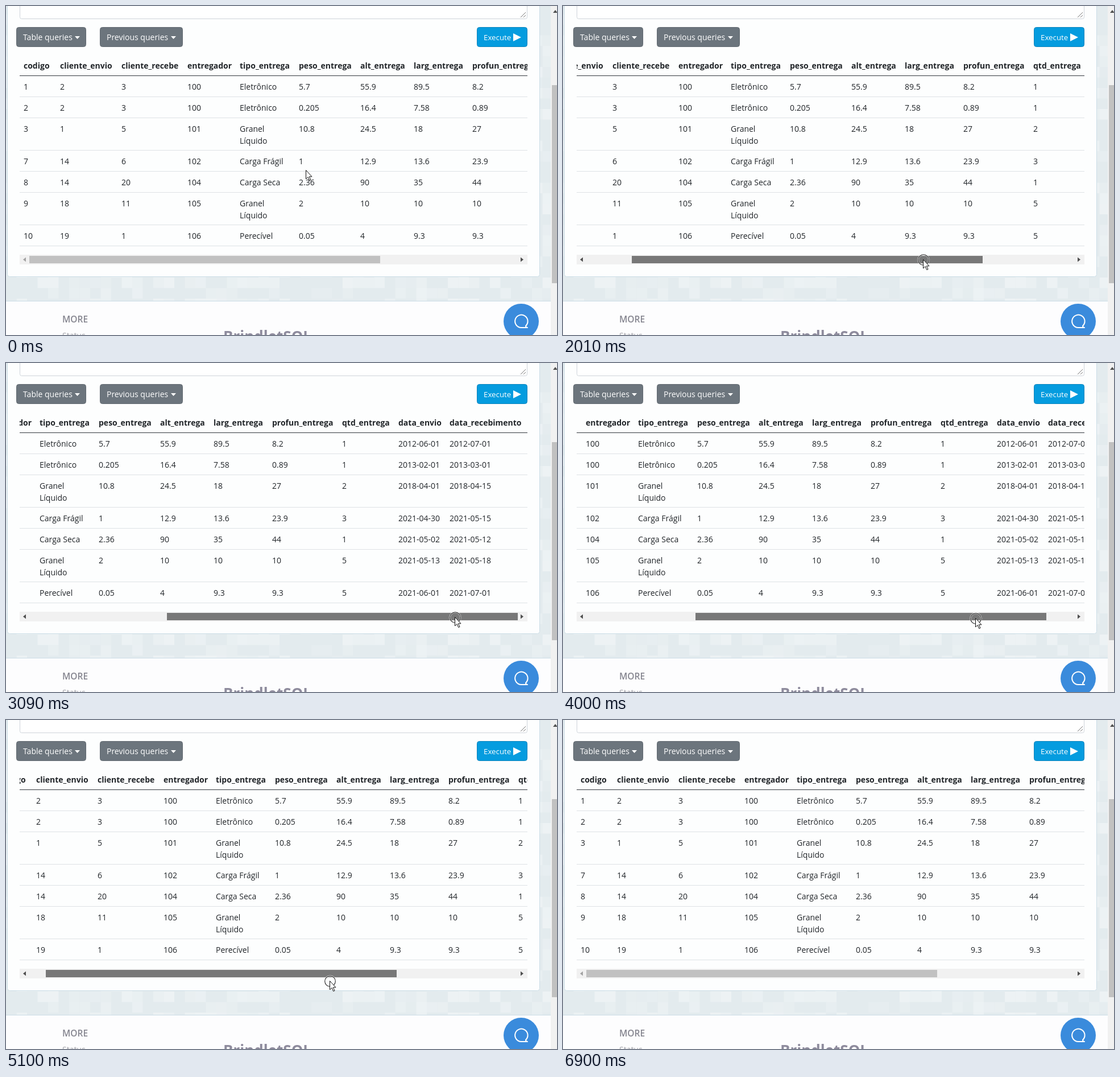
An HTML page for the animation above (7580 ms loop, 969x578 px).

```html
<!DOCTYPE html>
<html lang="en">
<head>
<meta charset="utf-8">
<title>Query results</title>
<style>
html, body { margin: 0; width: 100%; height: 100%; overflow: hidden; background: #e3ebee; }
svg { display: block; font: 14px "Open Sans", "Noto Sans", sans-serif; fill: #212529; }
.head { font-weight: 700; }
.white { fill: #fff; }
.grey { fill: #6c757d; stroke: #626a71; }
</style>
</head>
<body>
<svg width="969" height="578" viewBox="0 0 969 578">
  <defs><clipPath id="view"><rect x="24" y="90" width="893" height="340"/></clipPath></defs>
  <g id="tiles" fill="#fff"></g>
  <rect x="2.5" y="-9.5" width="936" height="485" rx="4" fill="#fdfefe" stroke="#cbdde6"/>
  <rect x="24.5" y="-9.5" width="892" height="32" rx="3" fill="#fff" stroke="#ced4da"/>
  <path d="M905 20l9-9M910 20l4-4" stroke="#777" fill="none"/>

  <g class="white">
    <rect class="grey" x="18.5" y="37.5" width="122" height="34" rx="4"/>
    <rect class="grey" x="165.5" y="37.5" width="145" height="34" rx="4"/>
    <rect x="828.5" y="37.5" width="88" height="34" rx="4" fill="#059cdf" stroke="#0b83bb"/>
    <text x="30" y="60">Table queries</text>
    <text x="177" y="60">Previous queries</text>
    <text x="840" y="60" font-size="13.3">Execute</text>
    <path d="M121 53h9l-4.5 5zM290 53h9l-4.5 5zM892 48l14 7-14 7z"/>
  </g>

  <g clip-path="url(#view)"><g id="table"></g></g>
  <g id="rules"></g>

  <rect x="24" y="437" width="893" height="17" fill="#f1f1f1"/>
  <path id="left" d="M35 441.5v8l-5-4z"/>
  <path d="M905 441.5v8l5-4z" fill="#505050"/>
  <rect id="thumb" y="439" width="617" height="13"/>

  <rect y="518" width="958" height="60" fill="#fdfdfe"/>
  <path d="M0 518.5h958" stroke="#cbdde6"/>
  <text x="99" y="556" font-size="15.5" font-weight="600" fill="#85858f">MORE</text>
  <text x="99" y="584" fill="#a3a3aa">Status</text>
  <text x="382" y="590" font-size="26" font-weight="700" fill="#8e8b9d">BrindletSQL</text>

  <rect x="958" width="11" height="578" fill="#f1f1f1"/>
  <rect x="960" y="139" width="9" height="348" fill="#c1c1c1"/>
  <path d="M962 12h8l-4-5z" fill="#505050"/>

  <circle cx="906" cy="554" r="31" fill="#3a8bdc"/>
  <path d="M914 562A11.2 11.2 0 1 0 906 565H917Q914 565 914 562z" fill="none" stroke="#fff" stroke-width="2" stroke-linejoin="round"/>

  <g id="pointer">
    <g id="ring" fill="none">
      <circle r="9.3" stroke="#fff" stroke-width="2.6" opacity=".75"/>
      <circle r="9.3" stroke="#222" stroke-width="1.1"/>
    </g>
    <path d="M-.5-.5V15l3.5-3.5 2.7 6 2.3-1-2.7-5.7H10z" fill="#fff" stroke="#111"/>
  </g>
</svg>
<script>
const $ = id => document.getElementById(id);
const set = (id, name, value) => $(id).setAttribute(name, value);

const columns = [31, 95, 203, 319, 411, 515, 623, 717, 820, 943, 1042, 1132];
const heads = "codigo,cliente_envio,cliente_recebe,entregador,tipo_entrega,peso_entrega,alt_entrega,larg_entrega,profun_entrega,qtd_entrega,data_envio,data_recebimento";
const rows = [
  "1,2,3,100,Eletrônico,5.7,55.9,89.5,8.2,1,2012-06-01,2012-07-01",
  "2,2,3,100,Eletrônico,0.205,16.4,7.58,0.89,1,2013-02-01,2013-03-01",
  "3,1,5,101,Granel|Líquido,10.8,24.5,18,27,2,2018-04-01,2018-04-15",
  "7,14,6,102,Carga Frágil,1,12.9,13.6,23.9,3,2021-04-30,2021-05-15",
  "8,14,20,104,Carga Seca,2.36,90,35,44,1,2021-05-02,2021-05-12",
  "9,18,11,105,Granel|Líquido,2,10,10,10,5,2021-05-13,2021-05-18",
  "10,19,1,106,Perecível,0.05,4,9.3,9.3,5,2021-06-01,2021-07-01"
];

function buildTable() {
  const line = (cells, y, cls = "") => cells.split(",").map((cell, i) =>
    cell.split("|").map((s, n) =>
      `<text class="${cls}" x="${columns[i]}" y="${y + 21 * n}">${s}</text>`).join("")).join("");
  const rule = (y, color) => `<path d="M24 ${Math.floor(y) + .5}h893" stroke="${color}"/>`;
  let y = 122.5;
  let text = line(heads, 110, "head");
  let rules = rule(y, "#32383e");
  for (const row of rows) {
    text += line(row, Math.round(y + 24.5));
    y += row.includes("|") ? 57.65 : 36.75;
    rules += rule(y, "#dee2e6");
  }
  $("table").innerHTML = text;
  $("rules").innerHTML = rules;
}

function buildTiles() {
  const size = 18.5;
  let seed = 7, out = "";
  for (let y = -4; y < 520; y += size)
    for (let x = 0; x < 958; x += size) {
      seed = seed * 16807 % 2147483647;
      const light = seed / 2147483647;
      if (light > .5)
        out += `<rect x="${x}" y="${y}" width="${size}" height="${size}" opacity="${(light - .4) * .6}"/>`;
    }
  $("tiles").innerHTML = out;
}

// Pointer moves: first step at `start`, `steps` equal jumps 120 ms apart, ending at x, y;
// `scroll` is the thumb offset reached by dragging.
const home = { x: 528, y: 289, scroll: 0 };
const moves = [
  { start: 310, steps: 3, x: 542, y: 409 },
  { start: 700, steps: 3, gap: 150, x: 544, y: 445 },
  { start: 1530, steps: 1, x: 553, y: 444, scroll: 6 },
  { start: 1650, steps: 8, x: 714, y: 447, scroll: 153 },
  { start: 2610, steps: 5, x: 790, y: 447, scroll: 242 },
  { start: 3640, steps: 4, x: 726, y: 449, scroll: 192 },
  { start: 4120, steps: 6, x: 651, y: 456, scroll: 110 },
  { start: 4860, steps: 7, x: 461, y: 462, scroll: -80 },
  { start: 5700, steps: 1, x: 447, y: 462 },
  { start: 5850, steps: 4, x: 643, y: 340 },
  { start: 6360, steps: 3, x: 797, y: 513 },
  { start: 6750, steps: 1, x: 829, y: 554 }
];

function pose(t) {
  let now = home;
  for (const { start, steps, gap = 120, x, y, scroll = 0 } of moves) {
    if (t < start) break;
    const part = Math.min(1, (Math.floor((t - start) / gap) + 1) / steps);
    const mix = (a, b) => a + (b - a) * part;
    now = { x: mix(now.x, x), y: mix(now.y, y), scroll: mix(now.scroll, scroll) };
  }
  return now;
}

function draw() {
  const t = (performance.now() - begin) % 7580;
  const { x, y, scroll } = pose(t);
  const offset = Math.max(0, Math.round(scroll));
  const pressed = t >= 1380 && t < 5850;
  const hover = t >= 850 && t < 1380;

  set("table", "transform", `translate(${-Math.round(offset * 1.455)})`);
  set("thumb", "x", 41 + offset);
  set("thumb", "fill", pressed ? "#787878" : hover ? "#a8a8a8" : "#c1c1c1");
  set("left", "fill", offset ? "#505050" : "#a3a3a3");
  set("pointer", "transform", `translate(${Math.round(x)} ${Math.round(y)})`);
  set("pointer", "visibility", t < 6900 ? "visible" : "hidden");
  set("ring", "display", pressed ? "inline" : "none");
  requestAnimationFrame(draw);
}

buildTable();
buildTiles();
const begin = performance.now();
draw();
</script>
</body>
</html>
```
